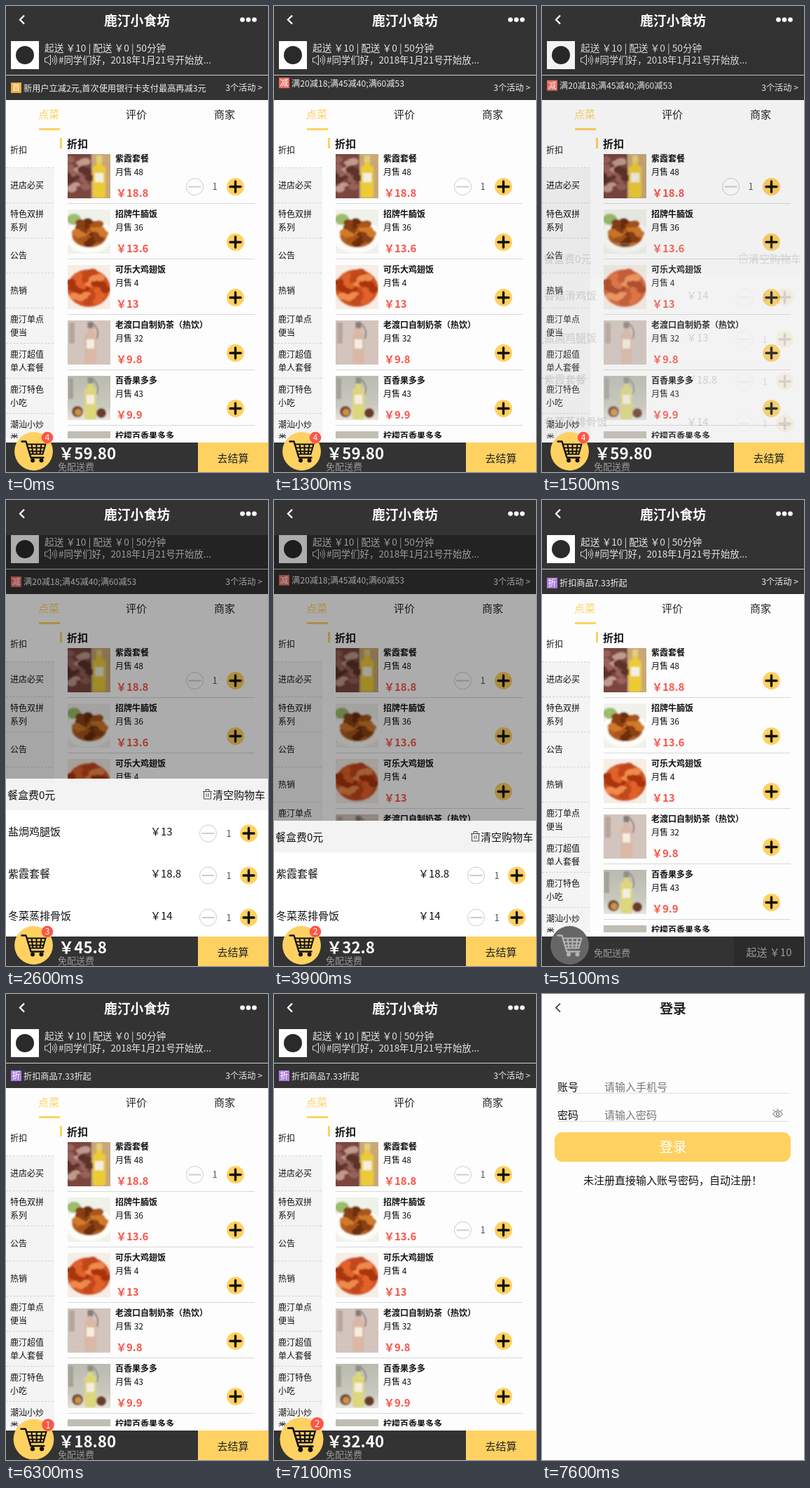
An HTML page that plays this animation: 374x664 px, repeating every 8 s.

```html
<!DOCTYPE html>
<html lang="zh-CN">
<head>
<meta charset="utf-8">
<style>
html, body { margin: 0; width: 100%; height: 100%; overflow: hidden; background: #fdfdfd; }
svg { display: block; width: 374px; height: 664px; font-family: "Noto Sans CJK SC", "Noto Sans CJK", sans-serif; }
</style>
</head>
<body>
<svg viewBox="0 0 374 664">
  <defs>
    <clipPath id="tickerClip"><rect y="99" width="374" height="35"/></clipPath>
    <clipPath id="listClip"><rect y="134" width="374" height="482"/></clipPath>
    <clipPath id="photoClip"><rect width="61" height="63"/></clipPath>
    <filter id="soft"><feGaussianBlur stdDeviation="1"/></filter>
    <linearGradient id="wall" x2="0" y2="1">
      <stop stop-color="#b9b9b0"/><stop offset=".65" stop-color="#c9c8bd"/><stop offset="1" stop-color="#ece9e2"/>
    </linearGradient>
  </defs>
  <g id="page"></g>
  <g id="counts"></g>
  <g id="header"></g>
  <g clip-path="url(#tickerClip)"><g id="ticker"></g></g>
  <rect id="shade" y="50" width="374" height="572"/>
  <g id="panel"></g>
  <g id="footer"></g>
  <g id="basket"></g>
  <circle id="ball" r="6" fill="#ff5448"/>
  <g id="login"></g>
</svg>
<script>
const LOOP = 8000, YELLOW = '#ffd161', RED = '#f5564b', DARK = '#333';
const $ = id => document.getElementById(id);
const clamp = v => Math.min(1, Math.max(0, v));

// y is the vertical centre of the glyphs
const text = (x, y, size, str, fill = '#111', extra = '') =>
  `<text x="${x}" y="${y + size * .37}" font-size="${size}" fill="${fill}" ${extra}>${str}</text>`;
const rect = (x, y, w, h, fill, extra = '') =>
  `<rect x="${x}" y="${y}" width="${w}" height="${h}" fill="${fill}" ${extra}/>`;
const circle = (x, y, r, fill, extra = '') => `<circle cx="${x}" cy="${y}" r="${r}" fill="${fill}" ${extra}/>`;
const ellipse = (x, y, rx, ry, fill) => `<ellipse cx="${x}" cy="${y}" rx="${rx}" ry="${ry}" fill="${fill}"/>`;
const line = (d, stroke, width = 1, extra = '') =>
  `<path d="${d}" fill="none" stroke="${stroke}" stroke-width="${width}" ${extra}/>`;
const BOLD = 'font-weight="700"', MID = 'text-anchor="middle"', END = 'text-anchor="end"';

const plus = (x, y) => circle(x, y, 12.5, YELLOW) +
  line(`M${x - 7.5} ${y}h15M${x} ${y - 7.5}v15`, '#111', 3.4, 'stroke-linecap="round"');
const minus = (x, y) => circle(x, y, 12, '#fff', 'stroke="#ccc"') + line(`M${x - 9} ${y}h18`, '#ccc', 2);
const count = (x, y) => text(x, y, 13, 1, '#555', MID);

// Soft stand-ins for the dish photos, 61 x 63 each
const bottle = (x, w, cap, juice) => rect(x + w / 2 - 4, 2, 8, 10, cap) + rect(x + w / 2 - 4, 11, 8, 9, juice) +
  rect(x, 17, w, 45, juice, 'rx="4"') + rect(x + 3, 27, w - 6, 13, '#f3eee0');
const pile = (colors, n, cx, cy, rx, ry) => Array.from({ length: n }, (_, i) => {
  const a = i * 2.4, r = Math.sqrt(i / n);
  return ellipse(cx + rx * r * Math.cos(a), cy + ry * r * Math.sin(a), 7, 5, colors[i % colors.length]);
}).join('');
const photos = [
  rect(-3, -3, 67, 69, '#c9a878') + rect(-3, -3, 37, 69, '#7a4640') +
    pile(['#97625a', '#5d302c', '#c09a8c', '#7d443d'], 22, 14, 30, 18, 30) + bottle(36, 18, '#e5cf7c', '#eccb35'),
  rect(-3, -3, 67, 69, '#f0f2ea') + ellipse(30, 38, 34, 24, '#fdfcf6') + ellipse(9, 14, 10, 8, '#9cbd6c') +
    ellipse(31, 37, 25, 17, '#b5601c') + pile(['#8a3f12', '#d07a2a', '#a9541a', '#6d2f0e'], 22, 31, 32, 21, 18),
  rect(-3, -3, 67, 69, '#f6ede4') + ellipse(30, 33, 31, 27, '#cf5420') +
    pile(['#e0622a', '#a9340f', '#f08a4c', '#c2461a'], 26, 30, 32, 27, 24),
  rect(-3, -3, 67, 69, '#d3c5bd') + rect(2, 3, 8, 30, '#b5a59c') + bottle(24, 17, '#857d78', '#d9b8a6') +
    line('M37 5Q46 14 42 26', '#6d625d', 1.5),
  rect(-3, -3, 67, 69, 'url(#wall)') + rect(1, 3, 7, 30, '#a3a29a') + bottle(24, 17, '#8d8f88', '#dcd67c') +
    line('M37 5Q46 14 42 26', '#777a72', 1.5) + circle(14, 51, 8, '#7a4433') + circle(15, 52, 5, '#c89448') +
    circle(48, 53, 7, '#6b3a2c'),
  rect(-3, -3, 67, 69, '#c0bdb2')
];

const dishes = [
  ['紫霞套餐', 48, 18.8], ['招牌牛腩饭', 36, 13.6], ['可乐大鸡翅饭', 4, 13],
  ['老渡口自制奶茶（热饮）', 32, 9.8], ['百香果多多', 43, 9.9], ['柠檬百香果多多', 21, 9.9]
];
const menu = ['折扣', '进店必买', '特色双拼|系列', '公告', '热销', '鹿汀单点|便当', '鹿汀超值|单人套餐', '鹿汀特色|小吃', '潮汕小炒|类'];
const rowY = i => 211 + 79 * i;

function buildPage() {
  const side = menu.map((label, i) => {
    const lines = label.split('|'), mid = 206 + 50 * i;
    return lines.map((s, k) => text(6, mid + (k - (lines.length - 1) / 2) * 19, 12, s)).join('') +
      line(`M0 ${mid + 24.5}h69`, '#d4d4d4', 1, 'stroke-dasharray="3 2"');
  }).join('');
  const list = dishes.map(([name, sold, price], i) => {
    const y = rowY(i);
    return `<g transform="translate(88 ${y})" clip-path="url(#photoClip)"><g filter="url(#soft)">${photos[i]}</g></g>` +
      text(156, y + 6.5, 12, name, '#111', BOLD) + text(156, y + 26, 12, '月售 ' + sold) +
      text(157, y + 55, 15, '￥' + price, RED, BOLD) + plus(327.5, y + 46.5) +
      line(`M88 ${y + 70.5}h267`, '#d8d8d8');
  }).join('');
  $('page').innerHTML = rect(0, 134, 374, 530, '#fdfdfd') +
    text(61, 154.5, 15, '点菜', YELLOW, MID) + text(186, 154.5, 15, '评价', '#222', MID) +
    text(312, 154.5, 15, '商家', '#222', MID) + rect(47, 174, 30, 3, YELLOW) +
    `<g clip-path="url(#listClip)">${rect(0, 231, 69, 391, '#f4f4f4')}${side}` +
    rect(77, 188, 3, 15, YELLOW) + text(87, 196, 15, '折扣', '#111', BOLD) + list + '</g>';
}

function buildHeader() {
  $('header').innerHTML = rect(0, 0, 374, 134, DARK) +
    line('M26 13.5L20 19.5L26 25.5', '#fff', 2.3) + text(187, 21.5, 18.8, '鹿汀小食坊', '#fff', `${BOLD} ${MID}`) +
    [337.5, 346, 354.5].map(x => circle(x, 19.5, 3.3, '#fff')).join('') +
    rect(7, 50, 40, 40, '#fff') + circle(27, 70, 13, '#2a2a2a') +
    text(55, 60, 13.7, '起送 ￥10 | 配送 ￥0 | 50分钟', '#e4e4e4') +
    line('M55.5 74h3l5-4v14l-5-4h-3zM66 74q2 3 0 6M68 72q4 5 0 10M70 70q5 7 0 14', '#ddd') +
    text(75, 77, 13.4, '#同学们好，2018年1月21号开始放...', '#e4e4e4') +
    line('M0 98.5h374', '#ccc') + text(366, 116.5, 12.2, '3个活动 &gt;', '#eee', END);
  const notices = [
    ['减', '#ee6a60', '满20减18;满45减40;满60减53'],
    ['折', '#ae7fdc', '折扣商品7.33折起'],
    ['首', '#f2a63c', '新用户立减2元,首次使用银行卡支付最高再减3元']
  ];
  $('ticker').innerHTML = notices.map(([tag, color, str], i) => {
    const y = 116.5 + STEP * i;
    return rect(7, y - 7.5, 15, 15, color) + text(14.5, y, 12, tag, '#fff', MID) + text(25, y + .5, 12.2, str, '#eee');
  }).join('');
}

function buildLogin() {
  const field = (y, label, hint) => text(22, y, 15, label) + text(89, y, 15, hint, '#777') +
    line(`M22 ${y + 9.5}h330`, '#ddd');
  $('login').innerHTML = rect(0, 0, 374, 664, '#fdfdfd') +
    line('M26 13.5L20 19.5L26 25.5', '#333', 1.7) + text(187, 21.5, 18.8, '登录', '#222', `${BOLD} ${MID}`) +
    field(132, '账号', '请输入手机号') + field(172, '密码', '请输入密码') +
    line('M329.5 171q7-9 14 0q-7 9-14 0M332 167l-2-2M336.5 165.5v-2M341 167l2-2', '#555') +
    circle(336.5, 171, 2.3, 'none', 'stroke="#555"') +
    rect(18, 197, 337, 42, YELLOW, 'rx="11"') + text(187, 218, 19.5, '登录', '#fff', MID) +
    text(59, 265, 15, '未注册直接输入账号密码，自动注册！');
}

// Cart contents from each moment on
const SET = ['紫霞套餐', 18.8], PORK = ['冬菜蒸排骨饭', 14], LEG = ['盐焗鸡腿饭', 13],
  CHICKEN = ['香菇滑鸡饭', 14], BEEF = ['招牌牛腩饭', 13.6];
const OPEN = 1450, CLEAR = 4330, TAPS = [5650, 6600], FLIGHT = 450, PULSE = 220, STEP = 33;
const cartStates = [
  [0, '59.80', [CHICKEN, LEG, SET, PORK]], [2600, '45.8', [LEG, SET, PORK]], [3400, '32.8', [SET, PORK]],
  [CLEAR, '', []], [TAPS[0], '18.80', [SET]], [TAPS[1], '32.40', [SET, BEEF]]
];

function showCart([, total, items]) {
  const full = items.length > 0, top = 577 - 60 * items.length;
  $('counts').innerHTML = dishes.map(([name], i) => {
    const y = rowY(i) + 46.5;
    return items.some(item => item[0] === name) ? minus(269.5, y) + count(298, y) : '';
  }).join('');
  $('panel').innerHTML = rect(0, top, 374, 622 - top, '#fff') + rect(0, top, 374, 45, '#f3f3f3') +
    text(2, top + 23, 15, '餐盒费0元') + text(295, top + 23, 15, '清空购物车') +
    line(`M281 ${top + 18.5}h13M285 ${top + 18}v-2.5h5v2.5M282.5 ${top + 19}v10h10v-10M286 ${top + 21}v5M289 ${top + 21}v5`, '#444') +
    items.map(([name, price], i) => {
      const y = top + 75 + 60 * i;
      return text(3, y, 15, name) + text(206, y, 15, '￥' + price) +
        minus(288.5, y + 3) + count(318, y + 3) + plus(346.5, y + 3);
    }).join('');
  $('footer').innerHTML = rect(0, 622, 374, 42, DARK) + rect(274, 622, 100, 42, full ? YELLOW : '#2b2b2b') +
    text(324, 644.5, 15, full ? '去结算' : '起送 ￥10', full ? '#222' : '#999', MID) +
    (full ? text(75, 638, 22.3, '￥' + total, '#fff', BOLD) : '') +
    text(74, full ? 656 : 645, 13, '免配送费', '#999');
  const ink = full ? '#111' : '#b4b4b4';
  $('basket').innerHTML = circle(0, 0, 27.4, full ? YELLOW : '#666') +
    line('M-17 -14h6l7 23h18', ink, 2.4, 'stroke-linejoin="round" stroke-linecap="round"') +
    line('M-10 -10h27l-4 14h-19M-9 -5h24M-7 0h21M-3 -10l2 14M4 -10v14M11 -10l-2 14', ink, 2) +
    circle(-1.5, 13, 3, ink) + circle(11, 13, 3, ink) +
    (full ? circle(19.5, -19.5, 8.3, '#ff5448') + text(19.5, -19.5, 12, items.length, '#fff', MID) : '');
}

// Standard CSS "ease" curve
function ease(x) {
  x = clamp(x);
  let lo = 0, hi = 1, s = x;
  for (let i = 0; i < 20; i++) {
    s = (lo + hi) / 2;
    if (.75 * s * (1 - s) + s ** 3 < x) lo = s; else hi = s;
  }
  return .3 * s * (1 - s) ** 2 + 3 * s * s * (1 - s) + s ** 3;
}

let shown;
function draw() {
  const t = performance.now() % LOOP;
  const state = cartStates.filter(s => s[0] <= t).pop();
  if (state !== shown) showCart(shown = state);

  const slot = 2 - 2 * ease((t - 130) / 1900) + ease((t - 3750) / 1900);
  $('ticker').setAttribute('transform', `translate(0 ${-STEP * slot})`);

  const open = ease((t - OPEN) / 400) - ease((t - CLEAR) / 400);
  $('shade').setAttribute('opacity', .32 * open);
  $('panel').setAttribute('opacity', open);

  let ball = null, scale = 1;
  TAPS.forEach((tap, i) => {
    const k = (t - tap) / FLIGHT, p = (t - tap - FLIGHT) / PULSE;
    if (k >= 0 && k < 1) {
      const y = 250 + 80 * i, curve = (a, b, c) => (1 - k) ** 2 * a + 2 * k * (1 - k) * b + k * k * c;
      ball = [curve(341, 190, 39), curve(y, y - 150, 634)];
    }
    if (p >= 0 && p < 1) scale += .2 * Math.sin(Math.PI * p);
  });
  $('ball').setAttribute('visibility', ball ? 'visible' : 'hidden');
  if (ball) $('ball').setAttribute('transform', `translate(${ball})`);
  $('basket').setAttribute('transform', `translate(39.5 634.5) scale(${scale})`);

  $('login').setAttribute('opacity', ease((t - 7450) / 150));
  requestAnimationFrame(draw);
}

buildPage();
buildHeader();
buildLogin();
draw();
</script>
</body>
</html>
```
